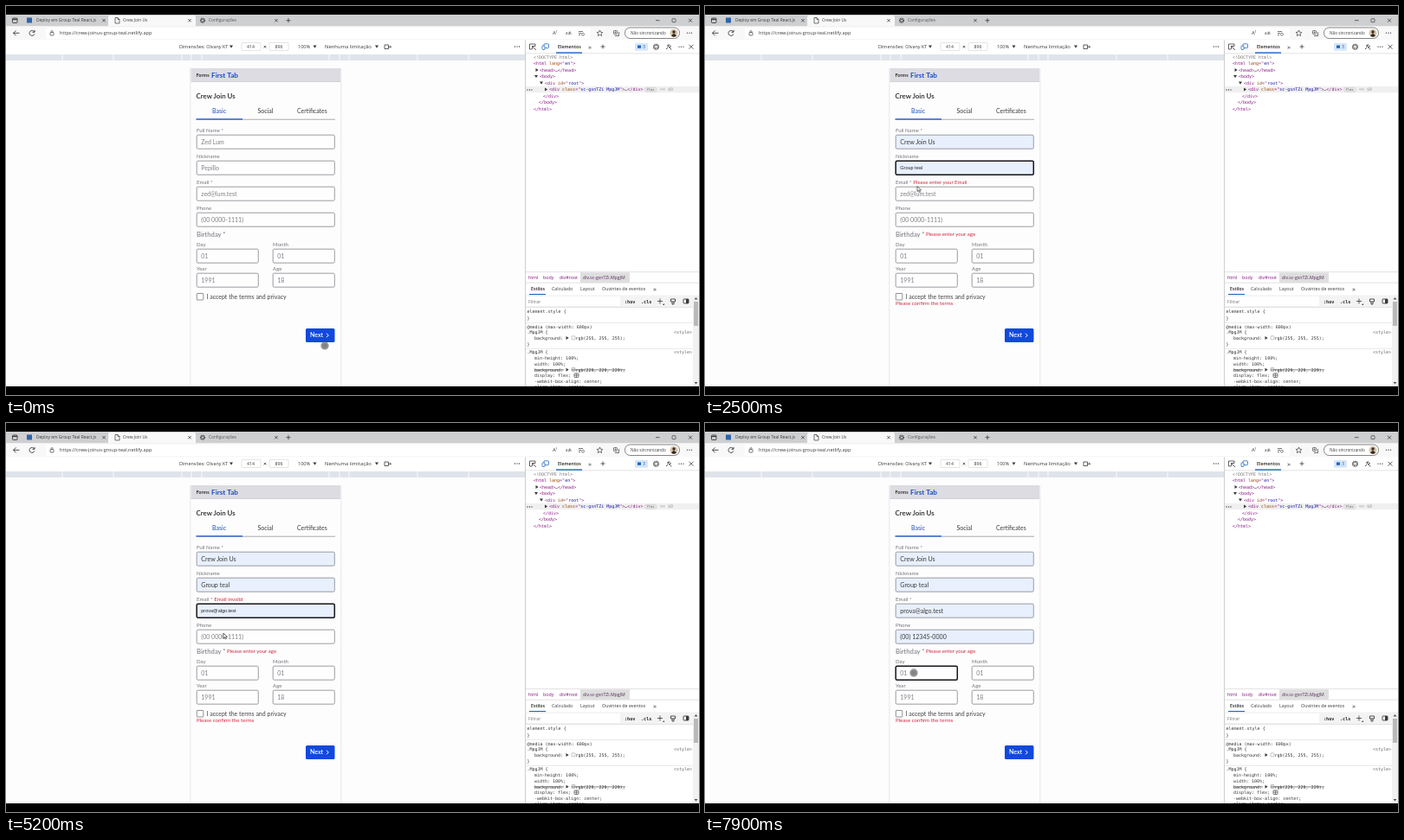
Write an HTML page that moves like this. It is 800 px wide and 450 px high and loops after 8 s.

```html
<!DOCTYPE html>
<html lang="en">
<head>
<meta charset="utf-8">
<title>Sign-up form</title>
<style>
html, body { margin: 0; width: 100%; height: 100%; overflow: hidden; background: #000; }
svg { display: block; width: 100vw; height: 100vh; }
text { white-space: pre; }
.ui { font-family: "Open Sans", "Noto Sans", sans-serif; }
.form { font-family: Lato, "Open Sans", sans-serif; }
.code { font-family: "DejaVu Sans Mono", "Liberation Mono", monospace; }
.hint { font-family: "Liberation Sans", Arial, sans-serif; }
</style>
</head>
<body>
<svg viewBox="0 0 800 450"><g id="page"></g><g id="live"></g></svg>
<script>
const INK = '#3a3a3a', BLUE = '#1a4fc0', RED = '#d6283f', GREY = '#808086';
const FULL_NAME = 'Crew Join Us', NICK = 'Group teal', EMAIL = 'prova@algo.test', PHONE = '(00) 12345-0000';

// Drawing helpers: each returns SVG markup
const esc = s => s.replace(/&/g, '&amp;').replace(/</g, '&lt;');
const rect = (x, y, w, h, fill, more = '') => `<rect x="${x}" y="${y}" width="${w}" height="${h}" fill="${fill}" ${more}/>`;
const circle = (x, y, r, fill, more = '') => `<circle cx="${x}" cy="${y}" r="${r}" fill="${fill}" ${more}/>`;
const line = (d, color = INK, w = .8, fill = 'none') => `<path d="${d}" stroke="${color}" stroke-width="${w}" fill="${fill}"/>`;
const text = (x, y, s, size, fill = INK, cls = 'form', more = '') =>
  `<text x="${x}" y="${y}" font-size="${size}" fill="${fill}" class="${cls}" ${more}>${esc(s)}</text>`;
const ui = (x, y, s, size = 5.3, fill = INK, more) => text(x, y, s, size, fill, 'ui', more);
const code = (x, y, ...parts) => {
  let spans = '';
  for (let i = 0; i < parts.length; i += 2) spans += `<tspan fill="${parts[i + 1]}">${esc(parts[i])}</tspan>`;
  return `<text x="${x}" y="${y}" font-size="5" class="code">${spans}</text>`;
};
const cross = (x, y, r = 2) => line(`M${x - r} ${y - r}l${2 * r} ${2 * r}m0 ${-2 * r}l${-2 * r} ${2 * r}`);
const plus = (x, y, r = 2.5) => line(`M${x - r} ${y}h${2 * r}M${x} ${y - r}v${2 * r}`);
const dots = (x, y) => [-2.5, 0, 2.5].map(d => circle(x + d, y, .65, INK)).join('');
const down = (x, y) => `<path d="M${x - 2} ${y - 1.6}h4l-2 3.4z" fill="${INK}"/>`;
const right = (x, y) => `<path d="M${x - 1.5} ${y - 2}v4l3.2-2z" fill="${INK}"/>`;
const gear = (x, y, r) => circle(x, y, r, 'none', `stroke="${INK}" stroke-width="1.1" stroke-dasharray="1.2 .6"`) +
  circle(x, y, r * .6, 'none', `stroke="${INK}" stroke-width=".7"`);
const box = (x, y, w, h, color = INK, width = .8, fill = 'none', r = .8) =>
  rect(x, y, w, h, fill, `rx="${r}" stroke="${color}" stroke-width="${width}"`);

function browser() {
  return rect(0, 10, 800, 430, '#fdfdfd') +
    rect(0, 10, 800, 13.5, '#cecfd1') +
    `<path d="M118 23.5V13q0-2 2-2h97q2 0 2 2v10.500z" fill="#f8f8f8"/>` +
    box(7.500, 14, 5.500, 5.500, INK, .9) + line('M7.5 15.500h5.500', INK, 1.2) +
    rect(24, 13.500, 6, 6, '#2e65ac') +
    `<svg x="35" y="10" width="71" height="13">${ui(0, 8.400, 'Deploy em Group Teal React.js', 4.900)}</svg>` +
    cross(113, 16.700, 1.700) +
    line('M126 13.500h3l2 2v4.500h-5zM129 13.500v2h2', INK, .7) +
    ui(135, 18.400, 'Crew Join Us', 4.900) + cross(212, 16.700, 1.700) +
    gear(227, 16.700, 2.500) + ui(234, 18.400, 'Configurações', 4.800, '#555') + cross(312, 16.700, 1.700) + plus(326, 16.700) +
    line('M750 16.700h4.500') + box(769, 14.700, 4, 4, INK, .7) + cross(790, 16.700) +
    // address bar
    rect(0, 23.500, 800, 16, '#f8f8f8') + rect(46, 25, 629, 13, '#fff', 'rx="2"') +
    line('M15.500 31.300h-7m3-3l-3 3l3 3', INK, .9) +
    line('M32.700 30a3 3 0 1 0 .2 2.300M33 27.800v2.500h-2.500', INK, .9) +
    box(51, 30.500, 4, 3.500, INK, .7) + line('M52 30.500v-1a1 1 0 0 1 2 0v1', INK, .6) +
    ui(62, 33.300, 'https://crew-joinus-group-teal.netlify.app', 5.600) +
    ui(631, 33.300, 'A⁾', 6) + ui(646, 33, 'aあ', 4.500) +
    line('M661 29.500h5m-5 2h3m-3 2h2', INK, .7) + circle(666, 32.700, 1.500, 'none', `stroke="${INK}" stroke-width=".6"`) +
    line('M685.500 28l1 2.200l2.400.3l-1.800 1.600l.5 2.400l-2.100-1.200l-2.100 1.200l.5-2.400l-1.800-1.600l2.400-.3z', INK, .7) +
    box(701.500, 28.500, 4, 4, INK, .7) + line('M703 34.500h4.500v-4.500M703.500 29.500v2m-1-1h2', INK, .7) +
    box(714.500, 25, 63, 12.500, '#555', .7, '#fff', 6) + ui(721, 33, 'Não sincronizando', 4.700) +
    circle(771, 31.200, 4.500, '#d9c6ae') + circle(771, 30, 1.700, '#33291f') +
    '<path d="M768 34.400q3-5 6 0q-3 2.500-6 0z" fill="#33291f"/>' + dots(789, 31.200) +
    // device toolbar
    rect(0, 39.500, 600, 16, '#fff') +
    ui(200, 49.200, 'Dimensões: Olvany KT', 5.450) + down(260, 47) +
    box(272, 42.500, 22, 9, '#d2d2d2', .6, '#fff') + ui(278, 49.200, '414', 5.200) + cross(299, 47.200, 1.300) +
    box(304, 42.500, 22, 9, '#d2d2d2', .6, '#fff') + ui(310.500, 49.200, '896', 5.200) +
    ui(337, 49.200, '100%', 5.500) + down(356.500, 47) + ui(368, 49.200, 'Nenhuma limitação', 5.900) + down(428, 47) +
    line('M437 45h4.500v4.500h-4.500zM441.500 47.200h3m-1.300-1.300l1.300 1.300l-1.300 1.300', INK, .8) + dots(590, 47) +
    rect(0, 56, 600, 7, '#dfe4eb') +
    [73.500, 85.500, 96.500, 175.500, 234.500].map(d => rect(299 - d, 56, 1, 7, '#f8f9fb') + rect(299 + d, 56, 1, 7, '#f8f9fb')).join('');
}

function devtools() {
  const tag = '#881280', attr = '#994500', val = '#1a1aa6', prop = '#333', grey = '#777';
  const rule = y => rect(600, y, 193, .6, '#ddd');
  const swatch = (y, n, more = '') => `<g ${more}>` + code(610, y, 'background:', prop) + '</g>' + right(648, y - 1.700) +
    box(653, y - 4, 4, 4, '#888', .5, n) ;
  return rect(600, 39.500, 200, 400.500, '#fff') + rect(599.200, 39.500, .8, 400.500, '#c4c4c4') +
    rect(600, 54.600, 200, .6, '#d0d0d0') +
    line('M607 50h-2.500v-6h6.500v2.500M607.500 46.500l4.500 4.500m-4.500-4.500v3.500m0-3.500h3.500', INK, .8) +
    box(621, 43.800, 5.500, 4.800, '#1a66c8', .8) + box(619, 46, 3, 4.500, '#1a66c8', .8, '#fff') +
    ui(637, 49.200, 'Elementos', 5.300, '#222', 'font-weight="600"') + rect(635, 53.400, 30, 1.400, '#1a66c8') +
    ui(672, 49.700, '»', 8) + plus(689, 47) +
    rect(726, 42.800, 15, 9, '#d6e6f9', 'rx="1.5"') + rect(729, 45.500, 4, 3.300, '#1a66c8') + ui(735, 49.200, '3', 5.200, '#1a56b8') +
    gear(750.500, 47.200, 3) + line('M762 50l2-2m-.5-2.500l3 3m-1.500-4l2.500 2.500l-2 1.500m-2-2l2-2M767 49l1 1.500', INK, .9) +
    dots(779.500, 47.200) + cross(791, 47.200, 2.500) +
    // element tree
    rect(600, 92.800, 200, 7.500, '#f0f0f0') +
    code(609, 60.800, '<!DOCTYPE html>', grey) +
    code(609, 68.300, '<html ', tag, 'lang', attr, '="', tag, 'en', val, '">', tag) +
    right(613, 74) + code(616, 75.800, '<head>', tag, '…', prop, '</head>', tag) +
    down(612, 81.500) + code(616, 83.300, '<body>', tag) +
    down(618, 89) + code(622, 90.800, '<div ', tag, 'id', attr, '="', tag, 'root', val, '">', tag) +
    dots(604.500, 97) + right(623.500, 96.500) +
    code(627, 98.300, '<div ', tag, 'class', attr, '="', tag, 'sc-gsnTZi MpgJM', val, '">', tag, '…', prop, '</div>', tag) +
    box(737.500, 94.300, 13.500, 5, '#c4c4c4', .5, '#e8e8e8', 2) + text(739.500, 98, 'flex', 3.800, '#555', 'code') +
    code(755, 98.300, '== $0', '#999') +
    code(620, 105.800, '</div>', tag) + code(615, 113.300, '</body>', tag) + code(609, 120.800, '</html>', tag) +
    // breadcrumb and tabs
    rect(600, 307.500, 200, .6, '#ccc') + rect(663, 308.300, 57, 11.500, '#dedede') +
    ui(603, 316, 'html', 5.300, tag) + ui(620, 316, 'body', 5.300, tag) + ui(639, 316, 'div#root', 5.300, tag) +
    ui(666, 316, 'div.sc-gsnTZi.MpgJM', 5.200, '#5a2a60') + rect(600, 319.800, 200, .6, '#ccc') +
    ui(606, 329, 'Estilos', 5.200, '#222', 'font-weight="600"') + rect(604, 333, 19, 1.300, '#1a66c8') +
    ui(630, 329, 'Calculado') + ui(663, 329, 'Layout') + ui(688, 329, 'Ouvintes de eventos') + ui(747, 329.600, '»', 8) +
    rect(600, 334.400, 200, 13.800, '#f3f3f3') + rect(601, 336, 108, 11, '#fff') + ui(603, 344, 'Filtrar', 5.300, '#777') +
    text(714, 343.800, ':hov', 5.200, '#222', 'code', 'font-weight="700"') +
    text(733, 343.800, '.cls', 5.200, '#222', 'code', 'font-weight="700"') +
    plus(755, 341.500, 3) + `<path d="M760 344v2h-2z" fill="${INK}"/>` +
    line('M767.500 339h5v3h-5zM769 342v3h2v-3', INK, .9) + box(782, 339, 6, 5, INK, .9) + rect(785, 339, 3, 5, INK) +
    rect(600, 348.200, 200, .6, '#d0d0d0') +
    // style rules
    code(601.500, 355.300, 'element.style {', prop) + code(601.500, 362.800, '}', prop) + rule(366) +
    code(601.500, 372.800, '@media (max-width: 600px)', prop) + code(601.500, 379.300, '.MpgJM {', prop) + code(771, 379.300, '<style>', '#666') +
    swatch(385.800, '#fff') + code(657.500, 385.800, 'rgb(255, 255, 255);', prop) + code(601.500, 392.500, '}', prop) + rule(396) +
    code(601.500, 402.300, '.MpgJM {', prop) + code(771, 402.300, '<style>', '#666') +
    code(610, 409, 'min-height: 100%;', prop) + code(610, 415.800, 'width: 100%;', prop) +
    swatch(422.500, '#e5e5e5') + code(657.500, 422.500, 'rgb(229, 229, 229);', prop) + line('M610 420.900h34M653 420.900h62', '#333', .6) +
    code(610, 429.200, 'display: flex;', prop) + box(656, 425, 5, 4.500, '#555', .8) + line('M656 427.200h5M658.500 425v4.500', '#555', .7) +
    code(610, 435.600, '-webkit-box-align: center;', prop) + code(610, 442, 'align-items: center;', prop) +
    rect(793, 335, 7, 105, '#f1f1f1') + rect(794, 342, 5, 28, '#b9b9b9') +
    '<path d="M794.500 339.500h4l-2-2.500zM794.500 435h4l-2 2.500z" fill="#555"/>' +
    rect(0, 440, 800, 10, '#000');
}

function form() {
  const label = (x, y, s, size = 6.100) => text(x, y, s, size, '#75757b');
  return rect(212, 72, 175.500, 368, '#eeeef1') + rect(213.500, 72, 172.500, 368, '#fdfdfe') +
    rect(213.500, 72, 172.500, 15.500, '#dcdce2') + rect(213.500, 87, 172.500, .7, '#c6c6cd') +
    text(219.500, 82.400, 'Forms', 5.500, '#333', 'form', 'font-weight="700"') +
    text(237, 83.300, 'First Tab', 8.200, BLUE, 'form', 'font-weight="700"') +
    text(219.500, 106.500, 'Crew Join Us', 7.900, '#222', 'form', 'font-weight="600"') +
    text(238, 124.300, 'Basic', 7, BLUE) + text(290.500, 124.300, 'Social', 7) + text(336, 124.300, 'Certificates', 6.900) +
    rect(273, 130.800, 107, .7, '#85858c') + rect(219.500, 130.300, 53.500, 1.400, BLUE) +
    label(220, 146.400, 'Full Name *') + label(220, 176.400, 'Nickname') + label(220, 206.400, 'Email *') +
    label(220, 236.400, 'Phone') + label(220, 267.400, 'Birthday *', 7.700) +
    label(220, 278.400, 'Day') + label(308, 278.400, 'Month') + label(220, 306.400, 'Year') + label(308, 306.400, 'Age') +
    box(220.300, 332.500, 7.500, 7.500, '#777', .8, '#fff', .5) + text(231.500, 338.900, 'I accept the terms and privacy', 7, '#444') +
    rect(346, 373, 33.500, 16, '#1149dc', 'rx="1.5"') + text(351, 383.400, 'Next', 7, '#fff', 'form', 'font-weight="600"') +
    line('M370 378.700l2.300 2.300l-2.300 2.300', '#fff', 1);
}

// x, y, width, placeholder, value, times of: focus, preview, commit, blur
const fields = [
  [220, 149, 159.500, 'Zed Lum', FULL_NAME, 1000, 1400, 1900, 2200],
  [220, 179, 159.500, 'Pepillo', NICK, 2200, 2500, 2800, 3500],
  [220, 209, 159.500, 'zed@lum.test', EMAIL, 3500, 4700, 5500, 5800],
  [220, 239, 159.500, '(00 0000-1111)', PHONE, 5800, 6200, 6800, 7500],
  [220, 281, 71.500, '01', '', 7500, 9e3, 9e3, 9e3],
  [308, 281, 71.500, '01'], [220, 309, 71.500, '1991'], [308, 309, 71.500, '18']
];

// x, y, message, start, end
const errors = [
  [253, 146.200, 'Please enter your Name', 400, 1900],
  [240.300, 206.200, 'Please enter your Email', 400, 4700],
  [240.300, 206.200, 'Email invalid', 4700, 5500],
  [255, 266.200, 'Please enter your age', 400, 8e3],
  [220, 346.200, 'Please confirm the terms', 400, 8e3]
];

// time, x, y, and 1 where the pointer is an arrow from then on
const path = [
  [0, 368, 393, 0], [300, 363, 382, 0], [450, 363, 382, 0], [950, 249, 159, 0], [1150, 249, 160, 1],
  [1450, 248, 186, 1], [1700, 248, 188, 1], [1900, 248, 188, 0], [2200, 246, 188, 0], [2400, 245, 200, 1],
  [2600, 245, 217, 1], [2800, 245, 218, 0], [3200, 245, 222, 0], [3500, 243, 218, 0], [3700, 240, 223, 1],
  [4300, 237, 229, 1], [4700, 249, 242, 1], [5200, 251, 243, 1], [5500, 251, 247, 0], [5800, 250, 248, 0],
  [6000, 250, 258, 1], [6300, 250, 276, 1], [6500, 250, 276, 1], [6800, 250, 278, 0], [7300, 241, 289, 0], [8000, 241, 289, 0]
];

function drawField([x, y, w, hint, value, focus, preview, commit, blur], time) {
  const focused = time >= focus && time < blur, filled = time >= commit, previewed = time >= preview;
  let out = box(x + .2, y + .2, w - .4, 16, focused ? '#15151a' : '#85858c', focused ? 1.500 : .8, previewed ? '#e8f0fd' : '#fefefe', 1.500);
  if (filled) out += text(x + 5.300, y + 10.500, value, 7.100);
  else if (previewed) out += text(x + 5.300, y + 10.200, value, 5.500, '#222', 'hint');
  else out += text(x + 5.300, y + 10.500, hint, 7, GREY);
  if (value === NICK && filled && focused) {
    out += line(`M225.500 191.300h19`, '#e04848', .8);
    if ((time - commit) % 1000 < 500) out += rect(259.300, 183, .7, 8, '#222');
  }
  return out;
}

function drawPointer(time) {
  const i = path.findIndex((p, k) => k + 1 === path.length - 1 || time < path[k + 1][0]);
  const [t0, x0, y0, arrow] = path[i], [t1, x1, y1] = path[i + 1];
  const u = (time - t0) / (t1 - t0), e = u * u * (3 - 2 * u);
  const x = x0 + (x1 - x0) * e, y = y0 + (y1 - y0) * e;
  return arrow
    ? line(`M${x} ${y}v6l1.400-1.200l1 2.200l1.100-.5l-1-2.100h1.900z`, '#333', .7, '#fff')
    : circle(x, y, 4.700, '#666', 'opacity=".65"') + circle(x, y, 3, '#666', 'opacity=".45"');
}

const live = document.getElementById('live');
document.getElementById('page').innerHTML = browser() + form() + devtools();

function frame(now) {
  const time = Math.floor(now % 8000 / 100) * 100;
  live.innerHTML = fields.map(f => drawField(f, time)).join('') +
    errors.filter(e => time >= e[3] && time < e[4]).map(e => text(e[0], e[1], e[2], 6.100, RED)).join('') +
    drawPointer(time);
  requestAnimationFrame(frame);
}
frame(0);
</script>
</body>
</html>
```
